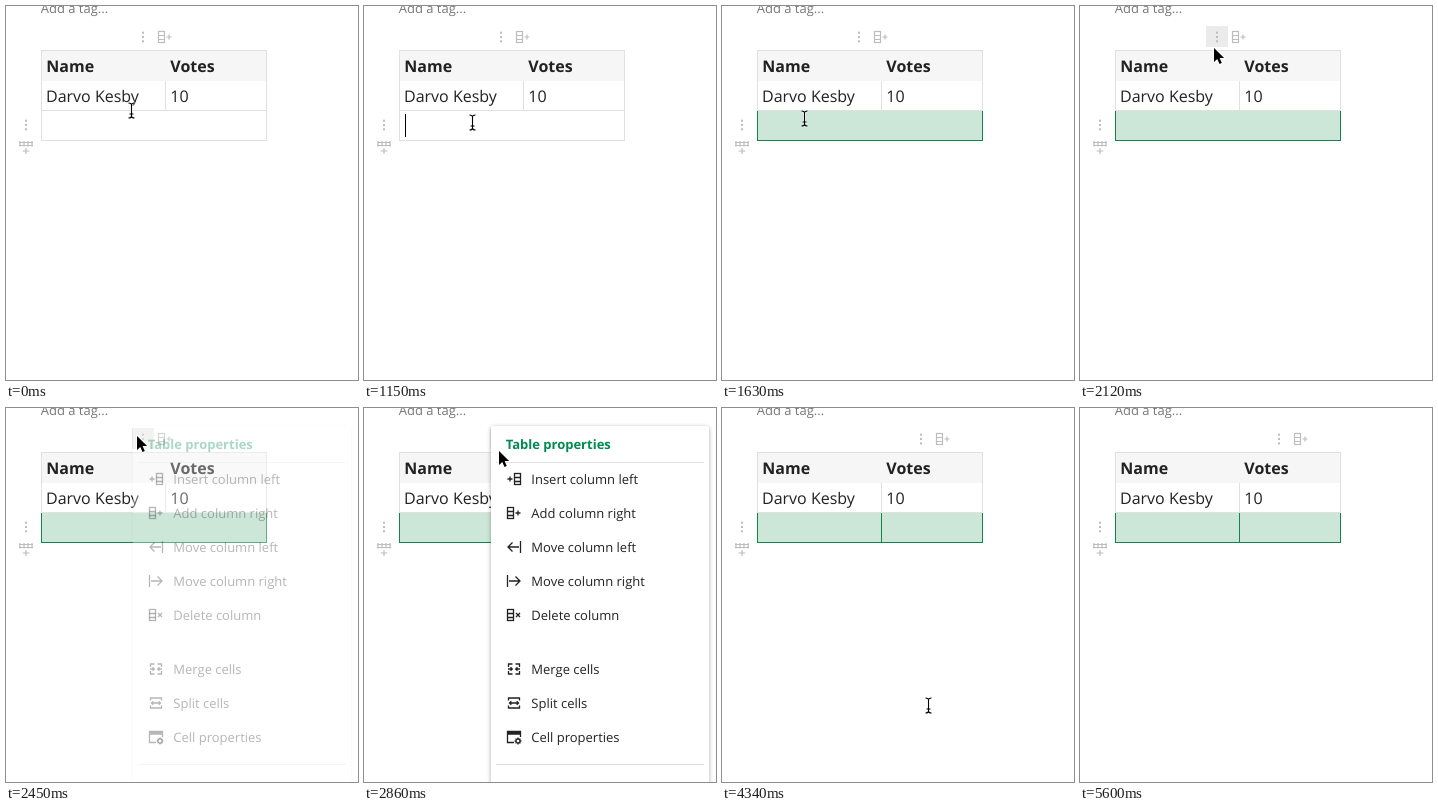
Write an HTML page with a canvas that moves like this. It is 352 by 374 pixels and loops after 6.36 s.

```html
<!DOCTYPE html>
<html lang="en">
<head>
<meta charset="utf-8">
<title>Split table cells</title>
<style>
html, body { margin: 0; width: 100%; height: 100%; overflow: hidden; background: #fff; }
canvas { display: block; width: 352px; height: 374px; }
</style>
</head>
<body>
<canvas id="stage"></canvas>
<script>
const W = 352, H = 374, LOOP = 6360;
const canvas = document.getElementById('stage');
const ctx = canvas.getContext('2d');
const dpr = window.devicePixelRatio || 1;
canvas.width = W * dpr;
canvas.height = H * dpr;

const FONT = '"Open Sans", "Noto Sans", sans-serif';
const GREEN = '#14844c', PALE = '#cce7d8', LINE = '#e0e0e0', HANDLE = '#bdbdbd';

const SHAPES = {
  beam: new Path2D('M-3 -7.5Q0 -7.5 0 -5.5V5.5Q0 7.5 -3 7.5M3 -7.5Q0 -7.5 0 -5.5M0 5.5Q0 7.5 3 7.5M-2 3.5H2'),
  arrow: new Path2D('M0 0V14L3.3 10.9L5.5 15.9L7.8 14.9L5.6 10H10.1Z'),
  hand: new Path2D('M-1 9V1.8a1.4 1.4 0 0 1 2.8 0V6.5a1.3 1.3 0 0 1 2.6 .3a1.3 1.3 0 0 1 2.5 .6a1.2 1.2 0 0 1 2.3 .8V11.5L7.7 14.5V17H1V15L-3.5 10.2a1.3 1.3 0 0 1 1.9 -1.8Z'),
  knuckles: new Path2D('M2 10.5V14M4.2 10.5V14M6.4 10.5V14'),
  moveLeft: new Path2D('M6.5 -6V6M5 0H-6M-1.5 -4.5L-6 0L-1.5 4.5'),
  moveRight: new Path2D('M-6.5 -6V6M-5 0H6M1.5 -4.5L6 0L1.5 4.5'),
  merge: new Path2D('M-1.5 -5H-5.5V-2M-5.5 2V5H-1.5M1.5 -5H5.5V-2M5.5 2V5H1.5M-6 0H-2M-3.5 -1.7L-1.7 0L-3.5 1.7M6 0H2M3.5 -1.7L1.7 0L3.5 1.7'),
  split: new Path2D('M-5.5 -2.5V-5H5.5V-2.5M-5.5 2.5V5H5.5V2.5M-4 0H4M-2.7 -1.7L-4.5 0L-2.7 1.7M2.7 -1.7L4.5 0L2.7 1.7'),
  panel: new Path2D('M0 5.5H-6.5V-5.5H6.5V0M-6.5 -4.2H6.5M-6.5 -3H6.5')
};

const ITEMS = [
  [71, 'Insert column left', () => columnIcon(-1)],
  [105, 'Add column right', () => columnIcon(1)],
  [139, 'Move column left', () => ctx.stroke(SHAPES.moveLeft)],
  [173, 'Move column right', () => ctx.stroke(SHAPES.moveRight)],
  [207, 'Delete column', () => columnIcon(1, true)],
  [261, 'Merge cells', () => ctx.stroke(SHAPES.merge)],
  [295, 'Split cells', () => ctx.stroke(SHAPES.split)],
  [329, 'Cell properties', panelIcon]
];

// Pointer moves: first and last step time, number of steps, end point.
const START = [125, 104];
const MOVES = [
  [80, 240, 3, [108, 116]],
  [1310, 1630, 5, [82, 112]],
  [1710, 1710, 1, [136, 56]],
  [1880, 2290, 6, [131, 28]],
  [2860, 3330, 7, [207, 297]],
  [4340, 4340, 1, [206, 297]]
];

function text(str, x, y, size, color, weight = 400) {
  ctx.font = `${weight} ${size}px ${FONT}`;
  ctx.textRendering = 'geometricPrecision';
  ctx.fillStyle = color;
  ctx.fillText(str, x, y);
}

function box(x, y, w, h, color) {
  ctx.fillStyle = color;
  ctx.fillRect(x, y, w, h);
}

function frame(x, y, w, h, color) {
  ctx.strokeStyle = color;
  ctx.lineWidth = 1;
  ctx.strokeRect(x + .5, y + .5, w, h);
}

function at(x, y, draw) {
  ctx.save();
  ctx.translate(x, y);
  draw();
  ctx.restore();
}

function segments(...lines) {
  ctx.beginPath();
  for (const [x1, y1, x2, y2] of lines) {
    ctx.moveTo(x1, y1);
    ctx.lineTo(x2, y2);
  }
  ctx.stroke();
}

// A three-cell column with a plus or a cross on one side.
function columnIcon(side, cross) {
  const x = side > 0 ? -6.5 : .5, s = 4 * side;
  ctx.strokeRect(x, -5.5, 6, 11);
  segments([x, -1.5, x + 6, -1.5], [x, 2.5, x + 6, 2.5]);
  if (cross) segments([s - 2, -2, s + 2, 2], [s - 2, 2, s + 2, -2]);
  else segments([s - 2.5, 0, s + 2.5, 0], [s, -2.5, s, 2.5]);
}

function rowIcon() {
  segments([-7, -4.5, 7, -4.5], [-7, -1.5, 7, -1.5]);
  segments(...[-6, -2, 2, 6].map(x => [x, -6, x, -.5]));
  segments([0, 1, 0, 7], [-3.3, 4, 3.3, 4]);
}

function panelIcon() {
  ctx.stroke(SHAPES.panel);
  ctx.beginPath();
  ctx.arc(4, 4, 2, 0, 7);
  ctx.stroke();
  for (let i = 0; i < 8; i++) {
    const a = i * Math.PI / 4, c = Math.cos(a), s = Math.sin(a);
    segments([4 + 2 * c, 4 + 2 * s, 4 + 3.4 * c, 4 + 3.4 * s]);
  }
}

function dots(x, y) {
  for (const d of [-4.3, 0, 4.3]) box(x - 1, y + d - 1, 2, 2, HANDLE);
}

function handles(x) {
  dots(x, 31);
  dots(20, 119);
  ctx.strokeStyle = HANDLE;
  ctx.lineWidth = 1.2;
  at(x + 22, 31, () => columnIcon(1));
  at(20, 141, rowIcon);
}

function table(selected, split) {
  text('Add a tag...', 34.7, 7, 13, '#787878');
  box(35, 44, 226, 31, '#f6f6f6');
  frame(35, 44, 225, 90, LINE);
  box(159, 75, 1, 30, LINE);
  text('Name', 40.3, 66, 16, '#222', 700);
  text('Votes', 164.3, 66, 16, '#222', 700);
  text('Darvo Kesby', 40, 96, 16, '#222');
  text('10', 164.3, 96, 16, '#222');

  if (selected) box(35, 105, 226, 30, PALE);
  const color = selected ? GREEN : LINE;
  box(35, 104, 226, 1, LINE);
  box(35, 134, 226, 1, color);
  for (const x of split ? [35, 159, 260] : [35, 260]) box(x, 105, 1, 30, color);
}

function menu(alpha, hoverY) {
  ctx.save();
  ctx.globalAlpha = alpha;

  const sheet = new Path2D();
  sheet.roundRect(127, 18, 218, 380, 3);
  const outside = new Path2D(sheet);
  outside.rect(0, 0, W, H + 40);
  ctx.save();
  ctx.clip(outside, 'evenodd');
  ctx.shadowColor = `rgba(0,0,0,${.35 * alpha})`;
  ctx.shadowBlur = 4 * dpr;
  ctx.shadowOffsetY = dpr;
  ctx.fillStyle = '#fff';
  ctx.fill(sheet);
  ctx.restore();

  ctx.fillStyle = '#fff';
  ctx.fill(sheet);
  if (alpha < .5) {
    ctx.globalAlpha = 1;
    box(127, 105, 133, 29, PALE);
    ctx.globalAlpha = alpha;
  }
  box(132, 54, 208, 1, '#e2e2e2');
  box(132, 356, 208, 1, '#dcdcdc');
  text('Table properties', 141.7, 41, 13, '#008a52', 700);
  for (const [y, label, icon] of ITEMS) {
    if (Math.abs(y - hoverY) <= 17) box(127, y - 17, 218, 34, '#d8d8d8');
    ctx.strokeStyle = '#222';
    ctx.lineWidth = 1.3;
    at(150, y, icon);
    text(label, 167.3, y + 5, 13, '#222');
  }
  ctx.restore();
}

function pointerAt(t) {
  let pos = START;
  for (const [t0, t1, n, end] of MOVES) {
    if (t < t0) break;
    const gap = n > 1 ? (t1 - t0) / (n - 1) : 1;
    const k = Math.min(n, Math.floor((t - t0) / gap + .001) + 1) / n;
    const e = k * k * (3 - 2 * k);
    pos = pos.map((p, i) => p + (end[i] - p) * e);
  }
  return pos.map(Math.round);
}

function pointer(t, x, y) {
  if (t >= 5600) return;
  const kind = t < 2120 || t >= 4340 ? 'beam' : t < 2930 ? 'arrow' : y > 54 ? 'hand' : 'arrow';
  const shape = SHAPES[kind];
  ctx.save();
  ctx.translate(x, y);
  ctx.lineJoin = 'round';
  if (kind === 'beam') {
    if (t >= 5530) ctx.globalAlpha = .4;
    ctx.translate(.5, .5);
    ctx.strokeStyle = 'rgba(255,255,255,.8)';
    ctx.lineWidth = 2.5;
    ctx.stroke(shape);
    ctx.strokeStyle = '#000';
    ctx.lineWidth = 1.1;
    ctx.stroke(shape);
  } else if (kind === 'arrow') {
    ctx.strokeStyle = '#fff';
    ctx.lineWidth = 2;
    ctx.stroke(shape);
    ctx.fillStyle = '#000';
    ctx.fill(shape);
  } else {
    ctx.fillStyle = '#fff';
    ctx.fill(shape);
    ctx.strokeStyle = '#000';
    ctx.lineWidth = 1.2;
    ctx.stroke(shape);
    ctx.lineWidth = .9;
    ctx.stroke(SHAPES.knuckles);
  }
  ctx.restore();
}

function menuAlpha(t) {
  if (t < 2370 || t >= 4340) return 0;
  return t < 2450 ? .1 : t < 2530 ? .33 : t < 2610 ? .75 : 1;
}

function caretOn(t) {
  return t >= 160 && t < 580 || t >= 820 && t < 1080 || t >= 1150 && t < 1550;
}

function draw(t) {
  const split = t >= 4340;
  const [x, y] = pointerAt(t);
  const alpha = menuAlpha(t);
  ctx.setTransform(dpr, 0, 0, dpr, 0, 0);
  box(0, 0, W, H, '#fff');
  if (t >= 2120 && !split) box(126, 20, 22, 21, '#ebebeb');
  handles(split ? 199 : 137);
  table(t >= 1550, split);
  if (caretOn(t)) box(41, 108, 1, 23, '#000');
  if (alpha) menu(alpha, t >= 2860 ? y : -100);
  pointer(t, x, y);
}

const begin = performance.now();
function tick() {
  draw((performance.now() - begin) % LOOP);
  requestAnimationFrame(tick);
}
tick();
</script>
</body>
</html>
```
